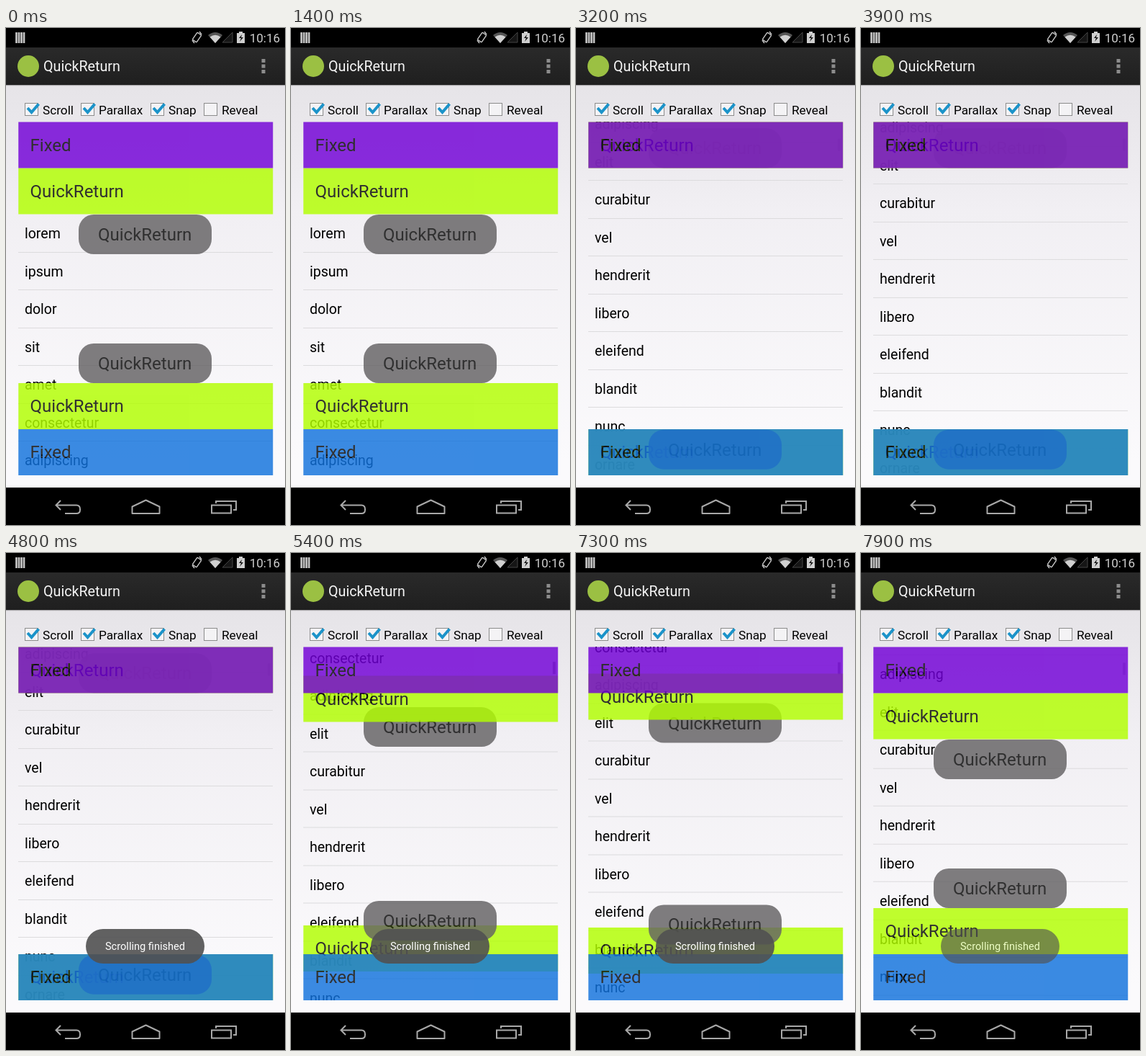
These frames come from a looping animation (388 px wide and 690 px high, 8000 ms). An HTML page:

```html
<!DOCTYPE html>
<html lang="en">
<head>
<meta charset="utf-8">
<title>Quick return list</title>
<style>
html, body { margin: 0; width: 100%; height: 100%; overflow: hidden; background: #000; }
#stage {
  position: relative; width: 388px; height: 690px; overflow: hidden;
  font-family: Roboto, "Noto Sans", sans-serif; color: #000;
  background: linear-gradient(#e6e4e8 79px, #f1eff3 250px, #fbfafc 600px);
}
#stage div, #stage svg, #stage span { position: absolute; white-space: nowrap; }
#chrome { left: 0; top: 0; }
.status { left: 0; top: 0; width: 388px; height: 27px; background: #000; }
.bar { left: 0; top: 27px; width: 388px; height: 52px; background: linear-gradient(#2a2a2a, #1f1f1f); box-shadow: 0 1px 1px #0004; }
.nav { left: 0; top: 638px; width: 388px; height: 52px; background: #000; }
.clock { right: 7px; top: 3px; font-size: 17px; line-height: 23px; color: #cfcfcf; }
.title { left: 52px; top: 40px; font-size: 19.7px; line-height: 28px; color: #f4f4f4; }
.label { top: 102px; font-size: 17.2px; line-height: 24px; }
#list { left: 17px; top: 130px; width: 354px; height: 491px; overflow: hidden; }
#rows { left: 0; top: 129px; width: 354px; }
.row { left: 0; width: 354px; height: 51.5px; border-bottom: 1px solid #dcdbdd; }
.row span { left: 9px; top: 0; font-size: 19.5px; line-height: 54px; }
#thumb { right: 3px; top: 5px; width: 4px; height: 17px; background: #999; }
.panel { left: 0; top: 0; width: 353.5px; height: 64px; opacity: .82; color: #060606; }
.panel span { left: 16.3px; top: 0; font-size: 24px; line-height: 65px; }
.pill { left: 0; top: 0; width: 185px; height: 55px; border-radius: 21px; background: #646264; opacity: .82; color: #060606; }
.pill span { left: 27px; top: 0; font-size: 24px; line-height: 57px; }
.lime { background: #b2ff00; }
.violet { background: #7200d7; }
.blue { background: #1172dd; }
#toast {
  left: 111px; top: 522px; width: 165px; height: 48px; border-radius: 24px;
  background: rgba(82, 82, 82, .9); color: #fff;
  font-size: 14.6px; line-height: 48px; text-align: center;
}
</style>
</head>
<body>
<div id="stage">
  <div id="list"><div id="rows"></div><div id="thumb"></div></div>

  <div class="pill" data-x="101" data-y="259" data-speed="-1.87"><span>QuickReturn</span></div>
  <div class="panel lime" data-x="17.25" data-y="194.5" data-speed="-1"><span>QuickReturn</span></div>
  <div class="panel lime" data-x="17.25" data-y="493" data-speed="1"><span>QuickReturn</span></div>
  <div class="pill" data-x="101" data-y="438" data-speed="1.87"><span>QuickReturn</span></div>
  <div class="panel violet" data-x="17.25" data-y="130.5" data-speed="0"><span>Fixed</span></div>
  <div class="panel blue" data-x="17.25" data-y="557" data-speed="0"><span>Fixed</span></div>

  <div class="status"></div>
  <div class="bar"></div>
  <div class="nav"></div>
  <svg id="chrome" width="388" height="690" fill="none">
    <path d="M14.500 6v15M18 6v15M21.500 6v15M25 6v15" stroke="#c4c4c4" stroke-width="2.7"/>
    <g stroke="#c8c8c8" stroke-width="1.4">
      <rect x="262" y="7" width="7" height="12" rx="1" transform="rotate(35 265.5 13)"/>
      <path d="M259 17l3 4M269 5l3 4"/>
    </g>
    <path d="M281 10Q291 2 301 10L291 21Z" fill="#555"/>
    <path d="M283.500 12.500Q291 7 298.500 12.500L291 21Z" fill="#d0d0d0"/>
    <path d="M301 20L315 6V20Z" stroke="#444" fill="#161616"/>
    <path d="M321 7h3v-2h5v2h3v14h-11z" fill="#cfcfcf"/>
    <path d="M328 9l-4 5h3l-2 5 5-6h-3z" fill="#111"/>
    <circle cx="31" cy="53" r="15" fill="#9bc043"/>
    <path d="M355.500 43h5v5h-5zM355.500 50.500h5v5h-5zM355.500 58h5v5h-5z" fill="#8c8c8c"/>
    <g stroke="#a9a9a9" stroke-width="2">
      <path d="M76 656L69.500 662.500L76 669M70 662.500H98Q103 662.500 103 668V669Q103 674 98 674H82"/>
      <path d="M175.500 674V664.500L194.500 655.500L213.500 664.500V674Z" stroke-linejoin="round"/>
      <path d="M286 662.500h27v11h-27zM292 660v-3h28v12h-4"/>
    </g>
    <g id="boxes"></g>
  </svg>
  <span class="clock">10:16</span>
  <span class="title">QuickReturn</span>
  <div id="toast">Scrolling finished</div>
</div>
<script>
const LOOP = 8000, STEP = 100, PITCH = 52.5;
const words = ("lorem ipsum dolor sit amet consectetur adipiscing elit curabitur vel hendrerit " +
  "libero eleifend blandit nunc ornare odio ut orci gravida").split(" ");
const options = [["Scroll", 27, 52, true], ["Parallax", 105, 130, true], ["Snap", 202, 227, true], ["Reveal", 276, 301, false]];

// Each track lists [time in ms, value].
const scrollTrack = [[2200, 0], [2700, 93.5], [3000, 400], [3200, 467], [4200, 460], [4800, 460],
  [6000, 345], [6500, 339], [7300, 417.5], [7600, 432.3]];
const hideTrack = [[2700, 0], [2900, 64], [4900, 64], [5700, 0], [7000, 0], [7300, 27], [7600, 0]];
const toastTrack = [[4200, 0], [4500, 1], [7700, 1], [7900, .72], [8000, .5]];
const thumbTrack = [[2100, 0], [2200, 1], [7600, 1], [7900, .6]];

const $ = id => document.getElementById(id);
const stage = $("stage"), rows = $("rows"), thumb = $("thumb"), toast = $("toast");

words.forEach((word, i) => {
  rows.insertAdjacentHTML("beforeend", `<div class="row" style="top:${i * PITCH}px"><span>${word}</span></div>`);
});

let boxes = "";
for (const [name, x, textX, on] of options) {
  boxes += `<rect x="${x - .5}" y="104.500" width="18" height="17" fill="#f4f3f5" stroke="#8c8c8c"/>`;
  if (on) boxes += `<path d="M${x + 3} 111l5.500 6l10-11.500" stroke="#1b93c9" stroke-width="4"/>`;
  stage.insertAdjacentHTML("beforeend", `<span class="label" style="left:${textX - 1}px">${name}</span>`);
}
$("boxes").innerHTML = boxes;

const movers = [...document.querySelectorAll("[data-speed]")].map(el => {
  const { x, y, speed } = el.dataset;
  return { el, x: +x, y: +y, speed: +speed };
});

function valueAt(track, t) {
  const i = track.findIndex(([time]) => time > t);
  if (i < 0) return track[track.length - 1][1];
  if (i === 0) return track[0][1];
  const [t0, a] = track[i - 1], [t1, b] = track[i];
  return a + (b - a) * (t - t0) / (t1 - t0);
}

const place = (el, x, y) => { el.style.transform = `translate(${x}px, ${y}px)`; };

function draw(t) {
  const scroll = valueAt(scrollTrack, t), hide = valueAt(hideTrack, t);
  place(rows, 0, -scroll);
  place(thumb, 0, scroll * .04);
  thumb.style.opacity = valueAt(thumbTrack, t);
  toast.style.opacity = valueAt(toastTrack, t);
  for (const { el, x, y, speed } of movers) place(el, x, y + hide * speed);
}

const start = performance.now();
function tick() {
  const t = (performance.now() - start) % LOOP;
  draw(Math.floor(t / STEP) * STEP);
  requestAnimationFrame(tick);
}
tick();
</script>
</body>
</html>
```
